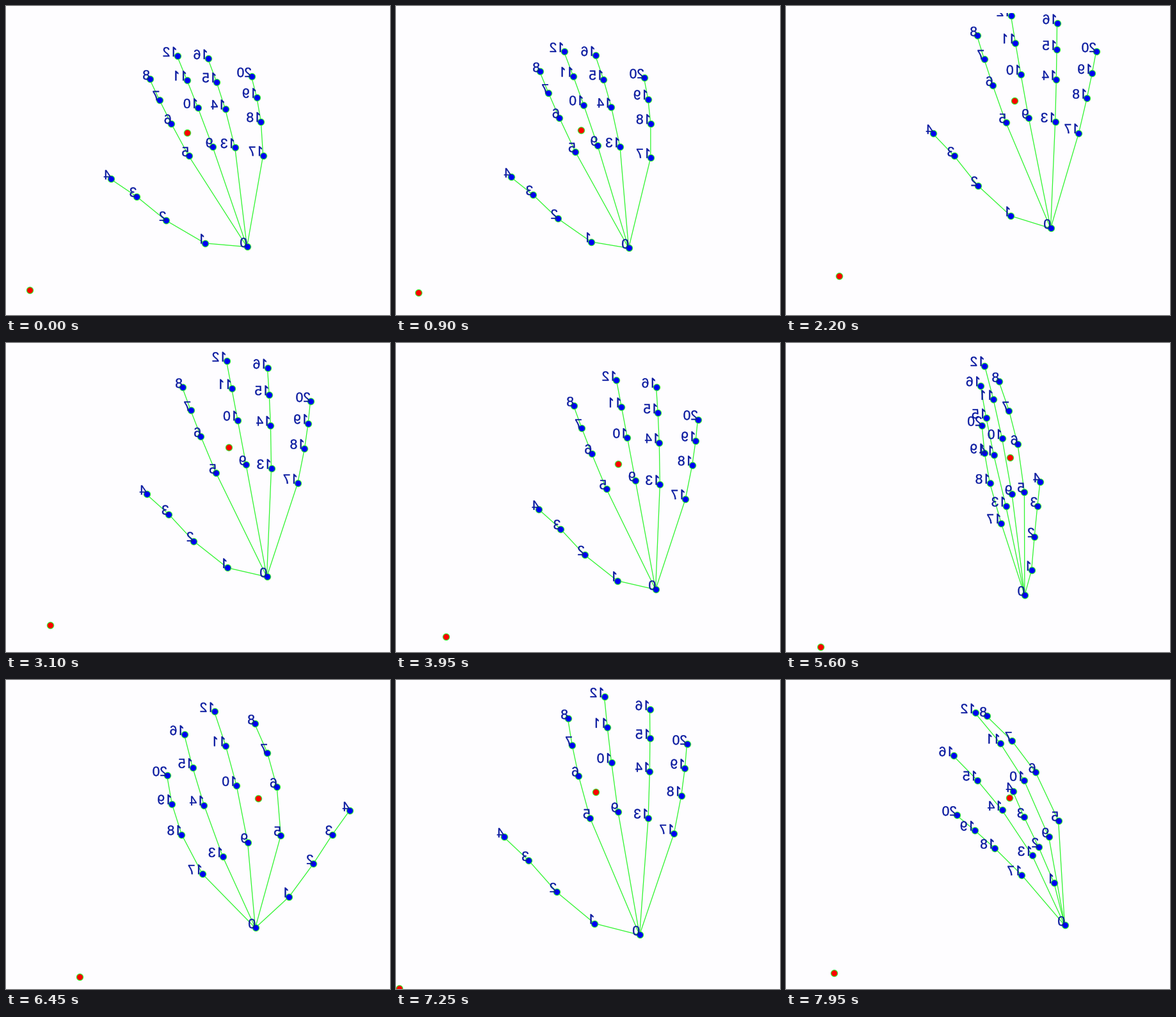
Animation, 600 px wide and 483 px high, one loop 8 s. Source, as a matplotlib script:

```python
import numpy as np
import matplotlib.pyplot as plt
from matplotlib.animation import FuncAnimation
from matplotlib.collections import LineCollection
from matplotlib.patches import PathPatch, Rectangle
from matplotlib.path import Path
from matplotlib.textpath import TextPath

W, H, DPI = 600, 483, 100
STEP, LOOP = 50, 8000
PX = 72 / DPI
PAPER, GREEN, BLUE, RED, INK = "#fefdff", "#32f532", "#0000f0", "#ff0000", "#0a1aa0"
EM = 21

# Points are complex numbers, x + yj with y down.
# Reach: how far along the line from wrist to tip each knuckle lies.
FLAT_REACH = 0.277, 0.557, 0.52, 0.52, 0.545
FORESHORTENED_REACH = 0.305, 0.47, 0.39, 0.38, 0.43


def finger(wrist, tip, reach, bend, is_thumb):
    """Four joints whose turn away from the straight line fades towards the tip."""
    along = np.array([0, 0.39, 0.72, 1] if is_thumb else [0, 0.43, 0.735, 1])
    turn = np.radians(bend) * (1 - along) ** (1.9 if is_thumb else 1)
    return wrist + (tip - wrist) * (reach + (1 - reach) * along) * np.exp(1j * turn)


def pose(wrist, tips, thumb_bend, index_bend, little_bend, reach=FLAT_REACH):
    bends = [thumb_bend, *np.linspace(index_bend, little_bend, 4)]
    joints = [finger(wrist, tip, r, b, i == 0)
              for i, (tip, r, b) in enumerate(zip(tips, reach, bends))]
    return np.concatenate([[wrist], *joints])


tilted = pose(376 + 376j, [163 + 270j, 224 + 114j, 267 + 78j, 315 + 82j, 383 + 110j],
              -21.5, -2.5, 8.5)
relaxed = pose(363 + 378j, [179 + 267j, 224 + 102j, 262 + 71j, 311 + 77j, 387 + 112j],
               -21.5, -2.2, 8.5)
raised = pose(413 + 347j, [229 + 199j, 298 + 46j, 351 + 15j, 423 + 27j, 484 + 71j],
              -21.5, -2, 2)
lowered = pose(407 + 365j, [219 + 236j, 275 + 69j, 344 + 28j, 408 + 39j, 475 + 91j],
               -21.5, -2, 4.3)
close = pose(385 + 398j, [173 + 245j, 273 + 60j, 330 + 26j, 401 + 46j, 459 + 100j],
             -21.5, -4.6, 4.8)
turned = pose(389 + 387j, [536 + 204j, 388 + 68j, 325 + 49j, 278 + 85j, 251 + 149j],
              8.6, 15.6, -14.3, FORESHORTENED_REACH)
edge_on = pose(435 + 383j, [354 + 174j, 313 + 56j, 295 + 51j, 261 + 118j, 266 + 211j],
               7, 17, 4, FORESHORTENED_REACH)


def bounds(hand):
    return hand.real.min(), hand.real.max(), hand.imag.min(), hand.imag.max()


def place(hand, center_x, top, scale):
    left, right, upper, _ = bounds(hand)
    return (hand - complex((left + right) / 2, upper)) * scale + complex(center_x, top)


KEYS = [
    (0, tilted),
    (450, (tilted + relaxed) / 2 - 14),
    (900, relaxed),
    (1100, relaxed + 2j),
    (1300, relaxed + 55 - 2j),
    (2200, raised),
    (2700, 0.3 * raised + 0.7 * lowered - 10),
    (3100, lowered),
    (3200, lowered - 5),
    (3400, place(lowered, 362, 58, 0.97)),
    (4200, place(lowered, 340, 58, 0.97)),
    (4750, close),
    (5050, close + 4),
    (5900, place(turned, 368, 40, 1.04)),
    (6150, place(turned, 378, 30, 1.08)),
    (6450, turned),
    (6750, place(edge_on, 362, 32, 1.08)),
    (7250, close - 5),
    (7650, close + 6),
    (7950, edge_on),
]
TIMES, POSES = zip(*KEYS)
HIDDEN = [(1150, 1300), (3250, 3400)]  # the hand is lost here


def hand_at(ms):
    i = int(np.clip(np.searchsorted(TIMES, ms, side="right") - 1, 0, len(KEYS) - 2))
    u = min((ms - TIMES[i]) / (TIMES[i + 1] - TIMES[i]), 1)
    return (1 - u) * POSES[i] + u * POSES[i + 1]


def markers_at(hand):
    left, right, upper, lower = bounds(hand)
    size = lower - upper
    palm = complex((left + right) / 2, (upper + lower) / 2 - 0.1 * size)
    return np.array([palm, palm + 0.825 * size * (-1 + 1j)])


def xy(points):
    return np.column_stack([points.real, points.imag])


# A footless one; the other digits come from the font.
ONE = Path(EM * np.array([(0.34, 0), (0.25, 0), (0.25, 0.56), (0.11, 0.475),
                          (0.11, 0.56), (0.28, 0.72), (0.34, 0.72), (0.34, 0)]),
           closed=True)


def glyph(char):
    if char == "1":
        return ONE
    return TextPath((0, 0), char, size=EM, prop={"family": "Liberation Sans"})


def mirrored_label(number):
    glyphs = [(glyph(c), 0.556 * EM * k) for k, c in enumerate(str(number))]
    return [Path((g.vertices + (x, 0)) * -1 + 0.5, g.codes) for g, x in glyphs]


LABELS = [mirrored_label(n) for n in range(21)]
FINGERS = [[0, *range(b, b + 4)] for b in range(1, 21, 4)]

fig = plt.figure(figsize=(W / DPI, H / DPI), dpi=DPI, facecolor=PAPER)
ax = fig.add_axes([0, 0, 1, 1])
ax.set(xlim=(-0.5, W - 0.5), ylim=(H - 0.5, -0.5))
ax.axis("off")

bones = ax.add_collection(
    LineCollection([], colors=GREEN, linewidths=1.3 * PX, zorder=1))
digits = ax.add_patch(
    PathPatch(ONE, fc=INK, ec=INK, lw=0.4 * PX, zorder=4))


def dots(color, zorder):
    return ax.plot([], [], "o", ms=10.2 * PX, mfc=color, mec=GREEN,
                   mew=1.1 * PX, zorder=zorder)[0]


joints, markers = dots(BLUE, 2), dots(RED, 3)
ax.add_patch(Rectangle((-1, -1), W + 1, 12, fc=PAPER, ec="none", zorder=5))
artists = [bones, joints, markers, digits]


def draw(frame):
    ms = frame * STEP
    visible = not any(start <= ms < end for start, end in HIDDEN)
    for artist in artists:
        artist.set_visible(visible)
    if visible:
        hand = hand_at(ms)
        points = xy(hand)
        bones.set_segments([points[f] for f in FINGERS])
        joints.set_data(*points.T)
        markers.set_data(*xy(markers_at(hand)).T)
        digits.set_path(Path.make_compound_path(
            *[Path(g.vertices + p, g.codes)
              for p, label in zip(points, LABELS) for g in label]))
    return artists


anim = FuncAnimation(fig, draw, frames=LOOP // STEP, interval=STEP,
                     repeat=True, repeat_delay=0, blit=False)
plt.show()
```
